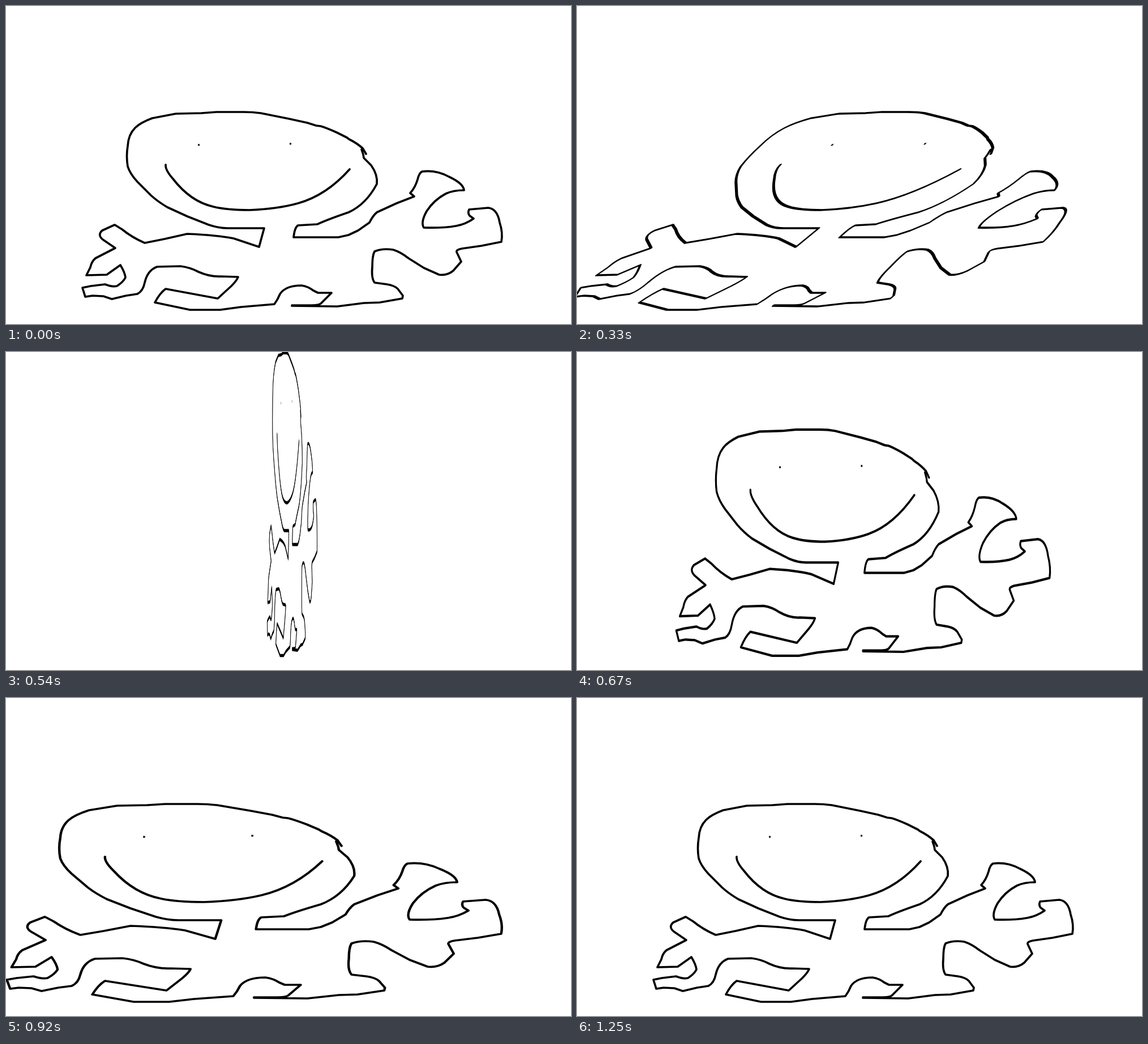
An HTML page with a canvas that plays this animation: 998x561 px, repeating every 1.29 s.

```html
<!DOCTYPE html>
<html>
<head>
<meta charset="utf-8">
<title>Wobbly doodle</title>
<style>
html, body { margin: 0; width: 100%; height: 100%; overflow: hidden; background: #fff; }
canvas { display: block; }
</style>
</head>
<body>
<canvas id="stage" width="998" height="561"></canvas>
<script>
const ctx = document.getElementById('stage').getContext('2d');
const LOOP = 1290, FRAME = 1250 / 30;

const head = `M636 261L630 251Q620 242 606 235L602 232L584 223Q566 215 556 212L548 211L532 206
  L500 199L450 189Q436 187 420 187L372 187L345 189L300 190L258 198Q237 206 228 215Q216 227 215 247
  Q212 265 215 283Q219 296 232 310L256 334Q268 345 285 355L320 371L358 386Q376 392 392 392L456 392L447 425`;
const leftBody = `M447 425L402 410Q370 404 320 402L280 411L245 418Q222 408 205 394L192 386L170 396
  Q161 404 171 412L193 427L158 445Q151 451 149 461L142 475L178 474L202 457Q210 470 211 479Q207 487 196 494
  Q187 496 175 491L150 494L135 497L140 513L153 511L172 512L187 517L212 511L232 508Q242 503 245 488
  Q250 466 267 460L308 459Q325 461 340 469Q360 478 380 477L410 478Q408 484 398 494L374 516L282 499
  Q272 506 263 523L325 536L378 536L415 531L474 526Q480 518 484 508Q494 493 522 493Q534 495 543 502
  L551 506L575 506L556 525Q552 528 540 528L505 528`;
const rightBody = `M505 529L585 530L632 524L660 523L700 516L701 511L692 499Q686 493 673 491L651 488
  Q645 480 647 460Q647 440 651 433Q665 427 684 430Q697 434 711 445L738 462L765 474Q779 476 790 467L804 451L796 434
  Q795 430 805 428L840 423L875 416Q878 400 872 382Q868 358 852 356L818 359Q815 365 819 370L826 375
  Q812 385 795 388Q772 392 738 391Q732 382 743 362Q756 342 777 331Q790 325 809 325Q808 313 782 301
  Q760 289 735 292Q730 294 727 306Q723 320 714 330L721 336L690 348L655 364Q648 370 642 382
  L622 396L605 404L587 408L508 408Q510 390 516 387L550 385Q567 377 605 364Q636 350 655 314
  Q657 298 645 281L632 268L631 262L628 253`;
const mouth = 'M282 280Q281 289 295 305Q326 345 366 354Q390 360 430 360Q480 358 516 348Q566 334 607 288';
const eyes = 'M339 245h3M501 243h3';

const outline = new Path2D(head + leftBody + rightBody + mouth);
const dots = new Path2D(eyes);

// Scale and shear about an anchor, as [a, c, d, e, f]
const pose = (sx, sy, ax, ay, shear = 0) =>
  [sx, shear, sy, ax * (1 - sx) - shear * ay, ay * (1 - sy)];

const rest = pose(1, 1, 0, 0);
const keys = [
  [0, rest],
  [2, pose(1.16, 1.03, 134, 186)],
  [4, rest],
  [5, rest],
  [8, pose(1, 1, 505, 361.5, -0.947)],
  [11, rest],
  [13, pose(0.119, 1.53, 505.5, 537)],
  [16, pose(0.891, 1.143, 505.5, 537)],
  [17, rest],
  [18, rest],
  [22, pose(1.18, 1, 877, 0)],
  [26, pose(1.007, 1, 877, 0)],
  [30, rest]
];

function poseAt(frame) {
  const i = Math.max(1, keys.findIndex(([at]) => at >= frame));
  const [t0, from] = keys[i - 1], [t1, to] = keys[i];
  const p = (frame - t0) / (t1 - t0);
  return from.map((v, k) => v + (to[k] - v) * p);
}

function stroke(path, width) {
  ctx.lineWidth = width;
  ctx.stroke(path);
}

function draw(now) {
  const frame = Math.min(30, Math.floor((now % LOOP + 5) / FRAME));
  const [a, c, d, e, f] = poseAt(frame);
  ctx.setTransform(1, 0, 0, 1, 0, 0);
  ctx.clearRect(0, 0, 998, 561);
  ctx.lineJoin = ctx.lineCap = 'round';
  ctx.setTransform(a, 0, c, d, e, f);
  stroke(outline, 3.7);
  ctx.lineCap = 'butt';
  stroke(dots, 3);

  // A hairline keeps strongly squeezed strokes visible
  const hairline = new Path2D();
  hairline.addPath(outline, new DOMMatrix([a, 0, c, d, e, f]));
  ctx.setTransform(1, 0, 0, 1, 0, 0);
  stroke(hairline, 0.9);
  requestAnimationFrame(draw);
}
requestAnimationFrame(draw);
</script>
</body>
</html>
```
